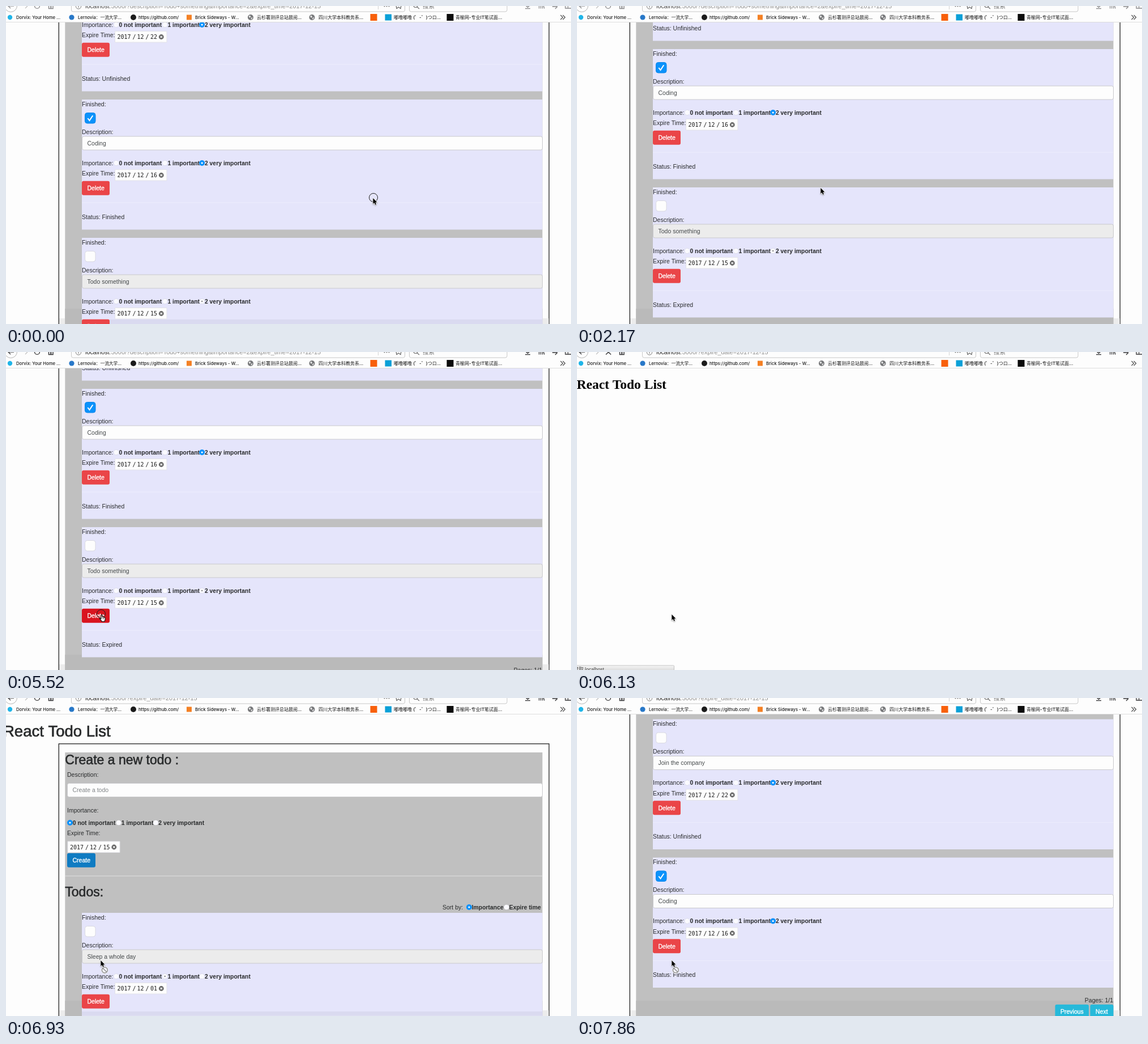
Animation of 998 by 561 pixels, one loop 8000 ms. Source, as an HTML page with a canvas:

```html
<!DOCTYPE html>
<html lang="en">
<head>
<meta charset="utf-8">
<title>Todo list</title>
<style>
html, body { margin: 0; width: 998px; height: 561px; overflow: hidden; background: #fdfdfd; }
canvas { display: block; }
</style>
</head>
<body>
<canvas id="stage" width="998" height="561"></canvas>
<script>
const W = 998, H = 561, LOOP = 8000, BAR = 28.5;
const c = document.getElementById('stage').getContext('2d');
const CJK = '"Noto Sans CJK SC", "Noto Sans CJK", sans-serif';
const SANS = '"Liberation Sans", Arial, ' + CJK;
const UI = 'Inter, ' + CJK;
const MONO = '"DejaVu Sans Mono", monospace';
const INK = '#292b2c', BLUE = '#0b92fb', RED = '#ea4548', SILVER = '#c0c0c0', PAPER = '#fdfdfd';

const PERIOD = 244, CARD = 229.5, FIRST = 379;
const todos = [
  { text: 'Sleep a whole day', level: 1, day: '01', status: 'Expired' },
  { text: 'Join the company', level: 2, day: '22', status: 'Unfinished' },
  { text: 'Coding', level: 2, day: '16', status: 'Finished' },
  { text: 'Todo something', level: 2, day: '15', status: 'Expired' }
];

// Stepped tracks: [start time, ...values]
const cursorTrack = [
  [0, 648, 339], [930, 520, 329], [1070, 430, 321], [2680, 410, 332], [2830, 340, 375],
  [2980, 245, 430], [3140, 184, 457], [3290, 167, 463]
];
const scrollTrack = [
  [0, 702], [1670, 703], [1820, 722], [2000, 760], [2170, 791], [2350, 802],
  [6280, 0], [7530, 95], [7690, 390], [7860, 585.5]
];
const at = (track, t) => track.filter(k => k[0] <= t).pop().slice(1);

function rect(x, y, w, h, fill) {
  c.fillStyle = fill;
  c.fillRect(x, y, w, h);
}

function box(x, y, w, h, r, fill, line) {
  c.beginPath();
  c.roundRect(x, y, w, h, r);
  if (fill) { c.fillStyle = fill; c.fill(); }
  if (line) { c.strokeStyle = line; c.lineWidth = 1; c.stroke(); }
}

function disc(x, y, r, fill, line, width = 1) {
  c.beginPath();
  c.arc(x, y, r, 0, 7);
  if (fill) { c.fillStyle = fill; c.fill(); }
  if (line) { c.strokeStyle = line; c.lineWidth = width; c.stroke(); }
}

function poly(points, line, width, fill, close) {
  c.beginPath();
  points.forEach(([x, y]) => c.lineTo(x, y));
  if (close) c.closePath();
  if (fill) { c.fillStyle = fill; c.fill(); }
  if (line) { c.strokeStyle = line; c.lineWidth = width; c.stroke(); }
}

function text(s, x, y, { size = 10.5, font = SANS, weight = 400, color = INK, heavy = 0, align = 'left' } = {}) {
  c.font = `${weight} ${size}px ${font}`;
  c.textAlign = align;
  c.fillStyle = color;
  c.fillText(s, x, y);
  if (heavy) {
    c.strokeStyle = color;
    c.lineWidth = heavy;
    c.strokeText(s, x, y);
  }
}

const bold = (s, x, y) => text(s, x, y, { size: 10.42, weight: 700 });

function button(label, x, y, w, fill) {
  box(x, y, w, 25, 3, fill);
  text(label, x + 9.5, y + 16.2, { color: '#fff', heavy: 0.35 });
}

function radio(x, y, on, off) {
  if (on && !off) {
    disc(x, y, 5, BLUE);
    disc(x, y, 1.6, '#fff');
  } else {
    disc(x, y, 4.6, '#fafaff', 'rgba(0,0,0,.07)');
    if (on) disc(x, y, 1.3, '#8c8c8c');
  }
}

function levels(x, y, level, off) {
  ['0 not important', '1 important', '2 very important'].forEach((s, i) => {
    const left = x + [0, 86, 151.5][i];
    radio(left, y, i === level, off);
    bold(s, left + 4.7, y + 3.7);
  });
}

function dateField(x, y, w, day) {
  box(x + 0.5, y + 0.5, w - 1, 19.5, 0, PAPER, '#e2e2e8');
  const o = { size: 10, font: MONO, color: '#1c1c1c' };
  [['2017', 4.5], ['/', 31.5], ['12', 39.5], ['/', 54.5], [day, 63]]
    .forEach(([s, dx]) => text(s, x + dx, y + 14, o));
  const cx = x + 82.3, cy = y + 10.5;
  disc(cx, cy, 4.4, '#666');
  poly([[cx - 1.7, cy - 1.7], [cx + 1.7, cy + 1.7]], '#fff', 1.2);
  poly([[cx + 1.7, cy - 1.7], [cx - 1.7, cy + 1.7]], '#fff', 1.2);
}

function field(x, y, s, fill, color) {
  box(x + 0.5, y + 0.5, 947 - x, 24, 3, fill, '#c9c9cc');
  text(s, x + 9.5, y + 16, { color });
}

function card(todo, y, delColor) {
  const off = todo.status === 'Expired', done = todo.status === 'Finished';
  rect(134, y, 813.5, CARD, '#e5e5fb');
  if (y + CARD > 553) rect(134, 553, 813.5, Math.min(H, y + CARD) - 553, '#dadaf0');
  text('Finished:', 134, y + 11.5);
  box(139.5, y + 23.5, 18.5, 18.5, 4, done ? BLUE : PAPER, done ? '#0a86ea' : '#d8d8e2');
  if (done) poly([[144.3, y + 33], [147.5, y + 37], [153.3, y + 28.3]], '#fff', 2);
  text('Description:', 134, y + 60.5);
  field(134, y + 64.5, todo.text, off ? '#ececec' : PAPER, '#464a4c');
  text('Importance:', 134, y + 115.5);
  levels(194.7, y + 112, todo.level, off);
  text('Expire Time:', 134, y + 134);
  dateField(192, y + 123, 92.5, todo.day);
  button('Delete', 134, y + 143.8, 49, delColor);
  rect(134, y + 181.5, 813.5, 1, 'rgba(255,255,255,.28)');
  text('Status: ' + todo.status, 134, y + 210.5);
}

function form(o) {
  const title = { size: 23, heavy: 0.6 };
  text('React Todo List', -5, 68.3 + o, { size: 27.5, heavy: 0.7 });
  text('Create a new todo :', 104.3, 117 + o, title);
  text('Description:', 108, 139 + o);
  field(108, 150 + o, 'Create a todo', PAPER, '#808487');
  text('Importance:', 108, 201.5 + o);
  levels(113, 220 + o, 0);
  text('Expire Time:', 108, 242 + o);
  dateField(108.5, 252.5 + o, 93, '15');
  button('Create', 108, 273.7 + o, 50, '#0f7bc2');
  rect(104, 313.5 + o, 843.5, 1, '#e2e2e2');
  text('Todos:', 104.3, 350 + o, title);
  text('Sort by:', 771, 372.5 + o);
  radio(818, 369 + o, true);
  bold('Importance', 822.7, 372.5 + o);
  radio(884, 369 + o);
  bold('Expire time', 888.7, 372.5 + o);
}

function page(scroll, list, delColor) {
  const o = -scroll, end = FIRST + list.length * PERIOD - PERIOD + CARD + o;
  c.strokeStyle = '#222';
  c.lineWidth = 1.3;
  c.strokeRect(93.3, 80.8 + o, 865.9, 3000);
  rect(94, 551, 10, 10, '#ececec');
  rect(948, 551, 10.6, 10, '#ececec');
  rect(104.3, 96 + o, 843.2, 3000, SILVER);
  rect(104.3, 534, 843.2, 27, '#bababa');
  if (scroll < 400) form(o);
  list.forEach((todo, i) => {
    const y = FIRST + i * PERIOD + o;
    if (y < H && y + CARD > 0) card(todo, y, i === 3 ? delColor : RED);
  });
  text('Pages: 1/1', 947, end + 26, { align: 'right' });
  button('Previous', 844.5, end + 29.8, 59.5, '#26b9da');
  button('Next', 906.5, end + 29.8, 41, '#26b9da');
}

function plainHeading() {
  text('React Todo List', -0.5, 65, {
    size: 23.5, weight: 700, color: '#000', font: '"Liberation Serif", Times, serif'
  });
}

function statusBar() {
  const g = c.createLinearGradient(0, 553, 0, 561);
  g.addColorStop(0, '#f6f6f6');
  g.addColorStop(1, '#dedede');
  box(-3, 553, 174.5, 20, 1, g, '#c4c4c4');
  text('读取 localhost', -5.5, 563, { size: 8.6, color: '#444' });
}

function globe(x, y) {
  disc(x, y, 5, '#77787a');
  poly([[x - 3.5, y - 2], [x - 1, y - 3.5], [x + 0.5, y - 1], [x - 1.5, y + 1]], null, 0, '#e8e8e8', true);
  poly([[x + 1, y + 1], [x + 3.5, y - 0.5], [x + 2.5, y + 3], [x + 0.5, y + 3.5]], null, 0, '#e8e8e8', true);
}

function bookmarks() {
  const link = (s, x, size = 7.7) => text(s, x, 23, { size, font: UI, weight: 500, color: '#1a1a1a' });
  disc(7, 20, 4.2, '#20b5e8');
  link('Dorvix: Your Home ...', 18);
  disc(116, 20, 4.6, '#2878c8');
  link('Lernovia：一流大学...', 127);
  disc(225, 20, 5, '#1b1b1b');
  link('https://github.com/', 234);
  rect(319, 15.5, 9, 9, '#f48024');
  link('Brick Sideways - W...', 334);
  globe(432, 20);
  link('云杉署测评总站晨阅...', 443, 8);
  globe(540.5, 20);
  link('四川大学本科教务系...', 552, 8);
  rect(643.5, 14, 12, 12, '#f8600c');
  rect(669.5, 14.5, 11.5, 11, '#0aa0d8');
  link('嘟噜嘟噜 (゜-゜)つロ...', 685, 8);
  rect(778.5, 14, 12, 12, '#0c0c0c');
  link('青榆网-专业IT笔试面...', 794, 8);
  [979.5, 983.5].forEach(x => poly([[x, 16], [x + 4, 20], [x, 24]], '#555', 1.3));
}

function toolbar(active, busy, fresh) {
  const ink = active ? '#3a3a3c' : '#8c8c8e';
  rect(0, 0, W, BAR, PAPER);
  rect(0, 28, W, 0.8, '#d8d8d8');
  disc(8.5, -0.5, 11, PAPER, '#b4b4b4');
  poly([[14, 0], [4, 0]], ink, 1.4);
  poly([[8, -4], [4, 0], [8, 4]], ink, 1.4);
  poly([[34, 4], [38, 0]], '#c0c0c0', 1.3);
  if (busy) {
    poly([[51, -4], [60, 4.5]], ink, 1.5);
    poly([[60, -4], [51, 4.5]], ink, 1.5);
  } else {
    c.beginPath();
    c.arc(55, 0, 4.4, 0, 3.8);
    c.strokeStyle = ink;
    c.lineWidth = 1.4;
    c.stroke();
  }
  poly([[75.5, -2], [75.5, 4.5], [83, 4.5], [83, -2]], ink, 1.5);
  rect(78.3, 0, 2, 4, ink);

  box(115.5, -14, 589, 24, 3, PAPER, '#c8c8c8');
  disc(128, 0.5, 4.6, null, '#777');
  rect(127.5, -1, 1, 4, '#777');
  const size = 10.85;
  text('localhost', 140, 4, { size, color: active ? '#222' : '#444' });
  text(fresh ? ':3000/?expire_date=2017-12-15'
    : ':3000/?description=Todo+something&importance=2&expire_time=2017-12-15', 182.8, 4, { size, color: '#8e8e8e' });
  rect(657, 0, 1, 6, '#d4d4d4');
  [668.5, 672.5, 676.5].forEach(x => disc(x, 0.5, 1, '#777'));
  poly([[689, -1], [690, 4.5], [693.5, 2], [697, 4.5], [698, -1]], '#666', 1.2);

  box(712.5, -14, 172.5, 24, 3, PAPER, '#c8c8c8');
  disc(723.5, -1, 3.5, null, '#777', 1.2);
  poly([[726, 1.5], [730, 5]], '#777', 1.4);
  text('搜索', 736, 4, { size: 10.5, font: UI, color: '#777' });
  poly([[918, -1], [921.5, 2.2], [925, -1]], ink, 1.5);
  rect(917, 3.8, 9, 1.4, ink);
  [941, 944, 947].forEach(x => rect(x, -2, 1.3, 6.5, ink));
  poly([[949, -2], [951, 4.5]], ink, 1.3);
  poly([[965, 1], [974, 1]], ink, 1.5);
  poly([[970, 5], [974, 1]], ink, 1.5);
  poly([[988, -3], [988, 4], [999, 4]], ink, 1.3);
  rect(992, -2, 1.2, 6, ink);
  bookmarks();
}

const arrow = [[0, 0], [0, 10.2], [2.3, 8.1], [3.8, 11.7], [5.6, 10.9], [4.1, 7.4], [7.1, 7.2]];
const hand = [
  [0, 0.8], [1, 0], [2, 0.8], [2.3, 4], [4, 3.8], [5.6, 4.5], [7.2, 5.4], [7.4, 8],
  [6.4, 10.2], [6.2, 12], [1.2, 12], [0, 9.8], [-2.6, 6.8], [-2, 5.8], [0, 7.2]
];

function pointer(x, y, kind, ring) {
  if (ring) disc(x + 1, y - 1, 7.5, null, '#222', 1);
  c.save();
  c.translate(x + 0.4, y);
  c.lineJoin = 'round';
  if (kind === 'hand') {
    c.translate(0.6, 0.5);
    poly(hand, '#111', 1.1, '#fff', true);
    [3, 4.8].forEach(dx => poly([[dx, 5], [dx, 7.5]], '#111', 0.7));
  } else {
    c.shadowColor = 'rgba(0,0,0,.35)';
    c.shadowBlur = 2;
    c.shadowOffsetY = 1;
    poly(arrow, '#fff', 1.6, null, true);
    c.shadowColor = 'transparent';
    poly(arrow, null, 0, '#000', true);
  }
  if (kind === 'blocked') {
    disc(7, 17, 5, 'rgba(255,255,255,.5)', '#f4f4f4', 3);
    disc(7, 17, 5, null, '#8e8e8e', 1.4);
    poly([[3.5, 13.5], [10.5, 20.5]], '#8e8e8e', 1.4);
  }
  c.restore();
}

function draw(t) {
  const busy = t >= 5680 && t < 6720, fresh = t >= 5680;
  rect(0, 0, W, H, PAPER);
  c.save();
  c.beginPath();
  c.rect(0, BAR, W, H);
  c.clip();
  if (t < 5830 || t >= 6280) {
    const red = t < 3710 ? RED : t < 3840 ? '#e22c33' : '#d9141f';
    page(at(scrollTrack, t)[0], t < 5830 ? todos : todos.slice(0, 3), red);
  } else if (t >= 5980) {
    plainHeading();
  }
  if (t >= 5680 && t < 6280) statusBar();
  c.restore();
  toolbar(t >= 3580, busy, fresh);
  const [x, y] = at(cursorTrack, t);
  const kind = t >= 6520 ? 'blocked' : t >= 3710 && t < 5830 ? 'hand' : 'arrow';
  pointer(x, y, kind, t < 150 || (t >= 5520 && t < 5680));
}

const start = performance.now();
function tick() {
  draw((performance.now() - start) % LOOP);
  requestAnimationFrame(tick);
}
tick();
</script>
</body>
</html>
```
